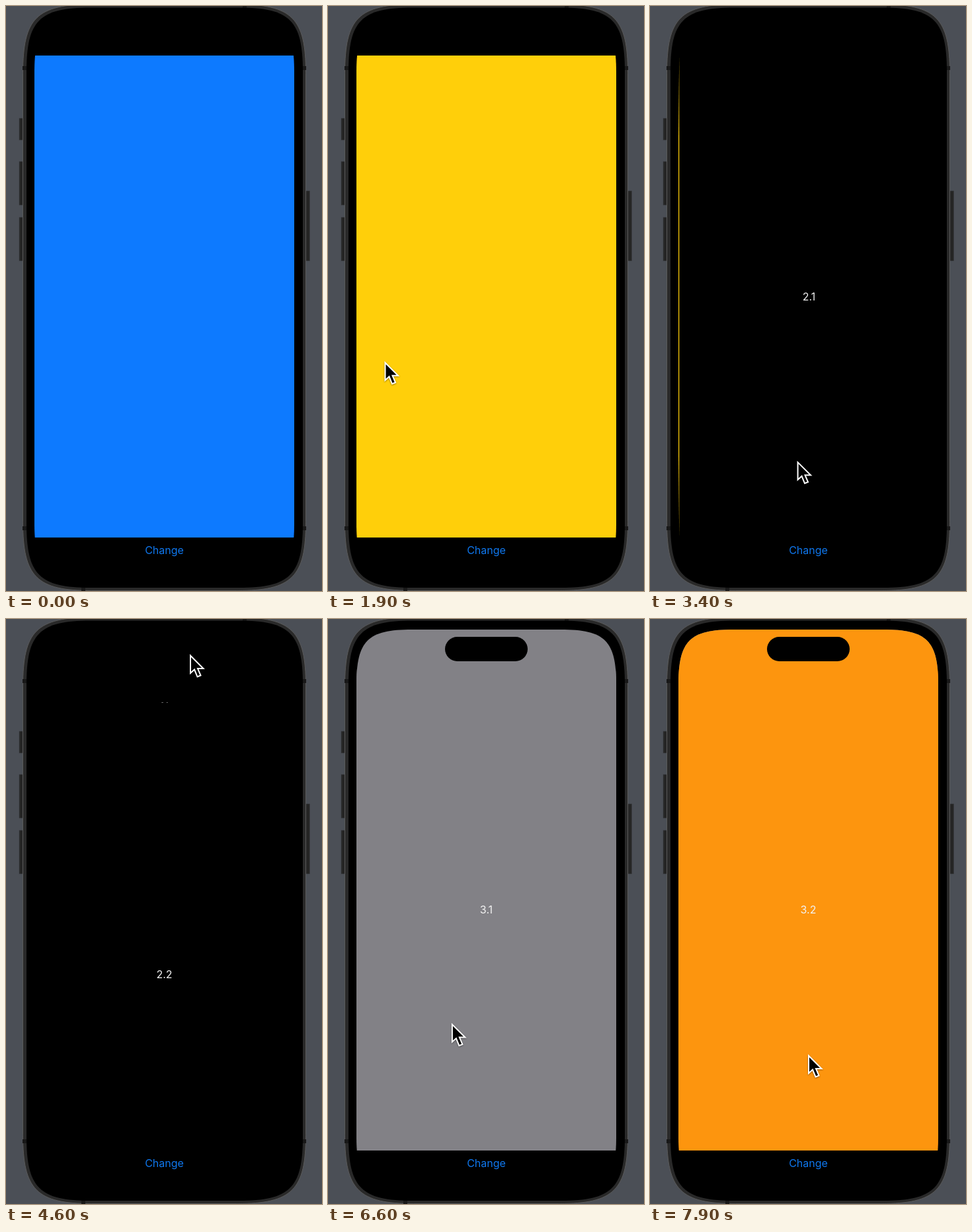
Animation, 478 px wide and 886 px high, one loop 8 s. Source, as an HTML page:

```html
<!DOCTYPE html>
<html lang="en">
<head>
<meta charset="utf-8">
<title>Cube pager</title>
<style>
  html, body { margin: 0; width: 100%; height: 100%; overflow: hidden; background: #4b4f56; }
  #stage { position: relative; width: 478px; height: 886px; overflow: hidden; font: 16px Inter, sans-serif; }
  svg, #screen, .page, .sub, #island, #change { position: absolute; }
  svg { left: 0; top: 0; }
  #screen { left: 43px; top: 16px; width: 393px; height: 852px; }
  .page { top: 59px; left: 0; width: 393px; height: 730px; }
  .sub { left: 0; top: 0; width: 393px; height: 730px; line-height: 730px; text-align: center; color: #f2f2f2; }
  #s31 { background: #828186; box-shadow: 0 -59px #828186; }
  #s32 { background: #fd950e; top: 730px; }
  #s22 { top: 730px; }
  #island { left: 177px; top: 27px; width: 125px; height: 37px; border-radius: 19px; background: #000; }
  #change { left: 43px; top: 814px; width: 393px; line-height: 20px; text-align: center; color: #0f77ee; }
  #cursor { filter: drop-shadow(0 1px 1px #0006); overflow: visible; }
</style>
</head>
<body>
<div id="stage">
  <svg width="478" height="886">
    <g fill="#252525" stroke="#3b3d41" stroke-width=".6">
      <rect x="20" y="170" width="6" height="33"/>
      <rect x="20" y="235.500" width="6" height="66"/>
      <rect x="20" y="320" width="6" height="66"/>
      <rect x="453" y="280" width="6.500" height="106"/>
    </g>
    <path id="rim" fill="#292929" stroke="#5a5a5a"/>
    <path d="M25 94h6M448 94h6M25 791h6M448 791h6M361 -2v5M117 880v6" stroke="#181818" stroke-width="6"/>
    <path id="bezel"/>
  </svg>
  <div id="screen">
    <div class="page" style="background:#0d7aff"></div>
    <div class="page" style="background:#ffcf0a"></div>
    <div class="page"><div class="sub" id="s21">2.1</div><div class="sub" id="s22">2.2</div></div>
    <div class="page"><div class="sub" id="s31">3.1</div><div class="sub" id="s32">3.2</div></div>
  </div>
  <div id="island"></div>
  <div id="change">Change</div>
  <svg id="cursor" width="24" height="38">
    <path d="M1 2.500V29L7 23.500L11.500 34.500L16.500 32.500L12 22H20.500Z" stroke="#fff" stroke-width="2"/>
  </svg>
</div>
<script>
const $ = id => document.getElementById(id);
const W = 393, H = 730, LOOP = 8000;
const pages = [...document.querySelectorAll('.page')];

// Rounded box with continuous corners reaching e along each side
function squircle(x, y, w, h, e) {
  const c = e * .2, r = x + w, b = y + h;
  return `M${x} ${y + e}C${x} ${y + c} ${x + c} ${y} ${x + e} ${y}H${r - e}` +
    `C${r - c} ${y} ${r} ${y + c} ${r} ${y + e}V${b - e}` +
    `C${r} ${b - c} ${r - c} ${b} ${r - e} ${b}H${x + e}` +
    `C${x + c} ${b} ${x} ${b - c} ${x} ${b - e}Z`;
}
$('rim').setAttribute('d', squircle(25.5, -2.5, 428, 888, 104));
$('bezel').setAttribute('d', squircle(31, 2.5, 418, 878.5, 97));
$('screen').style.clipPath = `path("${squircle(0, 0, 393, 852, 84)}")`;

const linear = k => k;
const smooth = k => k * k * (3 - 2 * k);
const settle = k => 1 - (1 - k) ** 3;

// Keys are [time, easing into this key, ...values]
function track(keys, t) {
  let i = keys.findIndex(k => k[0] > t);
  if (i < 0) return keys[keys.length - 1].slice(2);
  if (i === 0) return keys[0].slice(2);
  const a = keys[i - 1], b = keys[i];
  const k = b[1]((t - a[0]) / (b[0] - a[0]));
  return a.slice(2).map((v, j) => v + (b[j + 2] - v) * k);
}

const across = [
  [900, linear, 0], [1200, linear, .2545], [1550, linear, .964], [1800, settle, 1],
  [2400, linear, 1], [2900, linear, 1.603], [3050, linear, 1.7], [3500, settle, 2],
  [5300, linear, 2], [5500, linear, 2.1], [5900, linear, 2.5394], [6000, linear, 2.6], [6350, settle, 3]
];
const down2 = [[3800, linear, 0], [4600, linear, .8644], [4950, settle, 1]];
const down3 = [[6950, linear, 0], [7300, linear, .4027], [7400, linear, .5], [7850, settle, 1]];
const pointer = [
  [300, linear, 412, 640], [900, smooth, 394, 590], [1200, linear, 284, 577], [1550, linear, 5, 545],
  [1700, settle, 0, 520], [2300, smooth, 327, 588], [2400, linear, 327, 588], [2900, linear, 80, 566],
  [3050, settle, 50, 562], [3450, smooth, 230, 694], [3800, linear, 230, 694], [4600, linear, 278, 53],
  [4700, linear, 278, 56], [5250, smooth, 284, 535], [5300, linear, 284, 535], [5500, linear, 235, 524],
  [5900, linear, 62, 502], [6000, linear, 45, 500], [6700, smooth, 195, 618], [6950, linear, 195, 618],
  [7300, linear, 188, 314], [7400, linear, 188, 240], [7900, smooth, 239, 659]
];

function draw(t) {
  const [h] = track(across, t), [v2] = track(down2, t), [v3] = track(down3, t);
  pages.forEach((page, i) => {
    const off = i - h, s = page.style;
    s.visibility = Math.abs(off) < 1 ? 'visible' : 'hidden';
    s.overflow = off ? 'hidden' : 'visible';
    s.transformOrigin = off < 0 ? '100% 50%' : '0 50%';
    s.transform = off ? `translateX(${off * W}px) perspective(${H}px) rotateY(${off * 90}deg)` : 'none';
  });

  $('s21').style.transformOrigin = '50% 100%';
  $('s21').style.transform = `translateY(${-v2 * H}px) perspective(545px) rotateX(${v2 * 90}deg)`;
  $('s21').style.opacity = v2 < 1 ? 1 - v2 * .5 : 0;
  $('s22').style.transform = `translateY(${-v2 * H}px)`;

  $('s31').style.transform = $('s32').style.transform = `translateY(${-v3 * H}px)`;
  $('s32').style.opacity = v3 > 0 ? 1 : 0;
  $('s32').style.boxShadow = v3 === 1 ? '0 -59px #fd950e' : 'none';

  const [x, y] = track(pointer, t);
  $('cursor').style.visibility = t < 300 ? 'hidden' : 'visible';
  $('cursor').style.transform = `translate(${x}px, ${y}px)`;
}

const start = performance.now();
function tick() {
  draw((performance.now() - start) % LOOP);
  requestAnimationFrame(tick);
}
tick();
</script>
</body>
</html>
```
